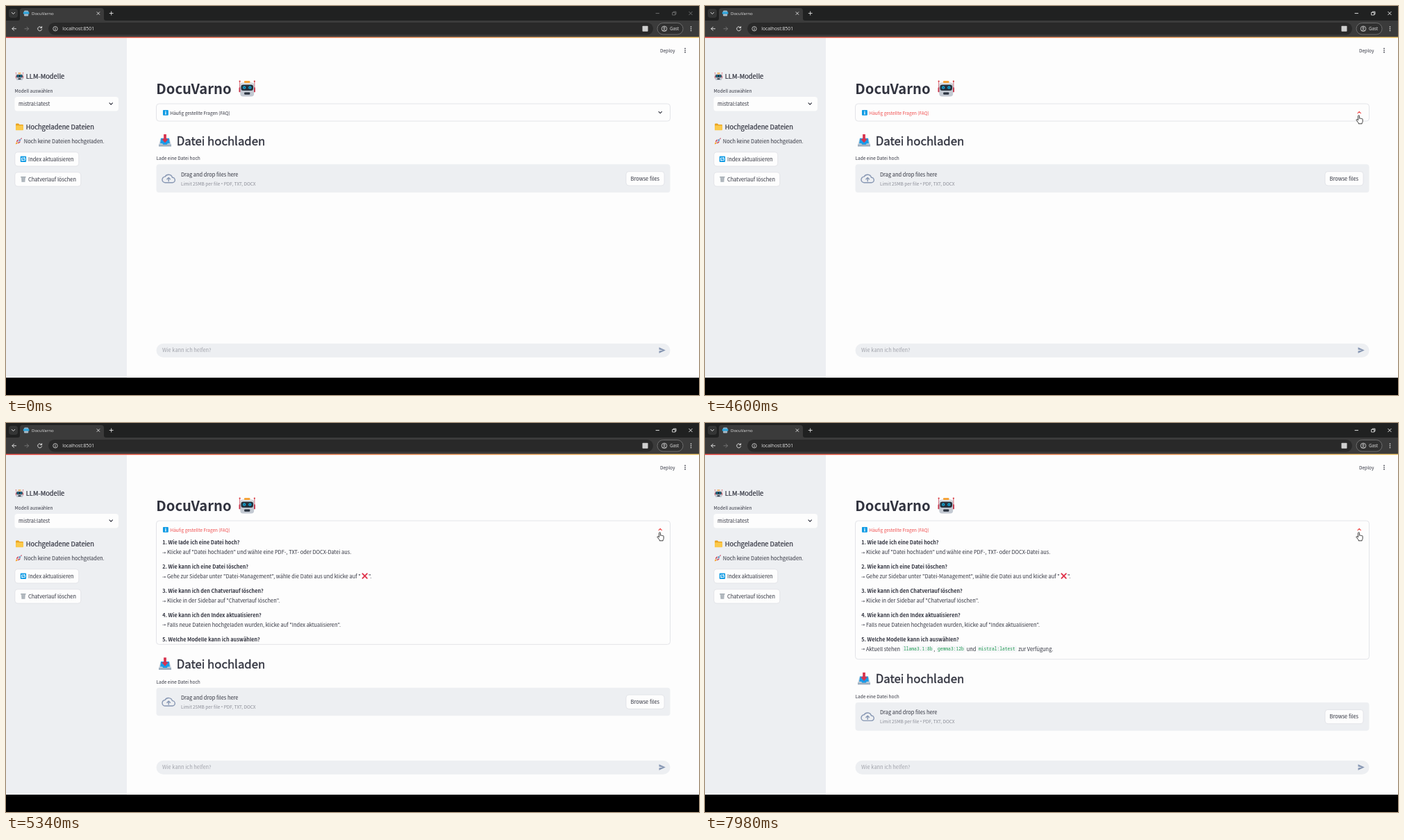
Animation, 998 px wide and 561 px high, one loop 8000 ms. Source, as an HTML page:

```html
<!DOCTYPE html>
<html lang="de">
<head>
<meta charset="utf-8">
<title>DocuVarno</title>
<style>
  html, body { margin: 0; width: 100%; height: 100%; overflow: hidden; background: #000; }
  svg { display: block; width: 998px; height: 561px; }
  text { font-family: "Noto Sans CJK SC", "Noto Sans CJK JP", "Noto Sans CJK", "Noto Sans", sans-serif; fill: #31333f; white-space: pre; }
  .ui { font-family: "Open Sans", "Noto Sans", sans-serif; fill: #e3e3e3; }
  .code { font-family: "Noto Sans Mono", monospace; fill: #1d9a50; }
  .arrow { font-family: "DejaVu Sans", sans-serif; }
  .bullet { font-family: "Open Sans", sans-serif; }
  .semi { stroke: #31333f; stroke-width: .024em; }
  .line { fill: none; stroke-linecap: round; stroke-linejoin: round; }
</style>
</head>
<body>
<svg id="stage" viewBox="0 0 998 561" xmlns="http://www.w3.org/2000/svg"></svg>
<script>
const LOOP = 8000;
const NAME = "DocuVarno";
const INK = "#31333f", RED = "#f04a4a", PANEL = "#edeff2", EDGE = "#dcdde2";

// The CJK family's Latin letters are drawn larger than the wanted design size.
const FONT_SCALE = 0.895;

const CLICK = 4560;
const MOVE = { start: 4220, end: 4460, from: [996, 300], to: [941.5, 157.5] };
const OPEN = { start: 4868, duration: 1415, distance: 174.7 };
const BOX = { top: 141, height: 25 };

const text = (x, y, size, s, attrs = "") =>
  `<text x="${x}" y="${y}" font-size="${(size * FONT_SCALE).toFixed(2)}" ${attrs}>${s}</text>`;
const ui = (x, y, size, s) => `<text class="ui" x="${x}" y="${y}" font-size="${size}">${s}</text>`;
const heading = (x, y, size, s) => text(x, y, size, s, 'class="semi"');
const rect = (x, y, w, h, r, fill, attrs = "") =>
  `<rect x="${x}" y="${y}" width="${w}" height="${h}" rx="${r}" fill="${fill}" ${attrs}/>`;
const line = (d, color, width = 1, attrs = "") =>
  `<path class="line" d="${d}" stroke="${color}" stroke-width="${width}" ${attrs}/>`;
const circle = (x, y, r, fill, attrs = "") => `<circle cx="${x}" cy="${y}" r="${r}" fill="${fill}" ${attrs}/>`;
const use = (id, x, y, size) => `<use href="#${id}" x="${x}" y="${y}" width="${size}" height="${size}"/>`;
const button = (x, y, w, h) => rect(x, y, w, h, 4, "#fdfdfd", `stroke="${EDGE}" stroke-width=".7"`);
const dots = (x, y, gap, color) => [-gap, 0, gap].map(d => circle(x, y + d, 0.85, color)).join("");
const chevron = (x, y, up) => `M${x - 2.2} ${y + (up ? 1.1 : -1.1)}l2.2 ${up ? -2.2 : 2.2}l2.2 ${up ? 2.2 : -2.2}`;

const defs = `<defs>
  <linearGradient id="stripe"><stop stop-color="#f0504a"/><stop offset="1" stop-color="#f8cf72"/></linearGradient>
  <clipPath id="boxClip"><rect id="clipRect" x="217" y="${BOX.top}" width="739" height="24"/></clipPath>
  <symbol id="robot" viewBox="0 0 24 24">
    ${line("M1.6 2V12M22.4 2V12", "#c9485a", 0.8)}
    ${circle(1.6, 2, 1.1, "#d9363e")}${circle(22.4, 2, 1.1, "#d9363e")}
    ${rect(0.5, 10.5, 3, 7, 1.2, "#c7344a")}${rect(20.5, 10.5, 3, 7, 1.2, "#c7344a")}
    ${rect(2.3, 3.8, 19.4, 19.7, 4, "#c3c9d2")}${rect(3.6, 4.4, 16.8, 8, 3, "#dde1e6")}
    ${rect(7.8, 1.4, 8.4, 3, 1.2, "#f6a43a")}
    ${rect(3.4, 6.8, 17.2, 8.4, 3, "#26313c")}
    ${circle(8, 11, 2.1, "#14b4e6")}${circle(16, 11, 2.1, "#14b4e6")}
    ${circle(8, 11, 0.9, "#0b4d68")}${circle(16, 11, 0.9, "#0b4d68")}
    ${rect(8, 17.6, 8, 3.2, 1, "#2b3440")}
  </symbol>
  <symbol id="inbox" viewBox="0 0 20 20">
    <path d="M3.5 6.5h13l3 10v2.5h-19v-2.5z" fill="#c9d3dd"/>
    <path d="M3.8 6.5h12.4l1 8H14l-1.5 2.3h-5L6 14.5H2.8z" fill="#1b9be8"/>
    <path d="M.5 16h19v3h-19z" fill="#9fb0c0"/>
    <path d="M8 .5h4v7h3.2L10 13.5 4.8 7.5H8z" fill="#d8344f"/>
  </symbol>
  <symbol id="folder" viewBox="0 0 12 12">
    <path d="M.6 2q0-1 1-1h3l1.2 1.5h4.6q1 0 1 1V10h-10.8z" fill="#e9a21f"/>
    <path d="M.6 10.8V4.5q0-.7.8-.7h9.2q.8 0 .8.8v5.4q0 .8-.8.8z" fill="#fbc94b"/>
  </symbol>
  <symbol id="rocket" viewBox="0 0 12 12">
    <path d="M2 6.3 4.3 3.5h2.3L3.7 7.5zM5.6 10 8.5 7.7V5.4L4.5 8.3z" fill="#d8344f"/>
    <path d="M3.3 7.5Q5.6 2.2 11.4.6 9.9 6.3 4.5 8.7z" fill="#c2ccd8"/>
    <path d="M9.2 1.5 11.4.6l-.9 2.3z" fill="#d8344f"/>
    ${circle(7.8, 4.2, 1.1, "#2486c8")}<path d="M1 11l.6-2.7 1.5-1 1.4 1.4-1 1.6z" fill="#f7a531"/>
  </symbol>
  <symbol id="sync" viewBox="0 0 10 10">
    ${rect(0.3, 0.3, 9.4, 9.4, 1.4, "#109be4")}
    ${line("M2.3 5.2V3.3h4.8M7.7 4.8v1.9H2.9", "#fff", 1)}
    <path d="M6.3 1.7 8.2 3.3 6.3 4.9zM3.7 5.1 1.8 6.7l1.9 1.6z" fill="#fff"/>
  </symbol>
  <symbol id="info" viewBox="0 0 10 10">
    ${rect(0.3, 0.3, 9.4, 9.4, 1.2, "#109be4")}${circle(5, 2.6, 0.9, "#fff")}${rect(4.2, 4.2, 1.6, 4, 0.2, "#fff")}
  </symbol>
  <symbol id="bin" viewBox="0 0 10 10">
    <path d="M1.5 2h7L7.8 9.6H2.2z" fill="#c3c9ce"/>
    ${line("M3.3 3.3l.3 5.3M5 3.3v5.3M6.7 3.3l-.3 5.3", "#929ba2", 0.6)}
    ${rect(0.9, 0.8, 8.2, 1.5, 0.7, "#9ba4aa")}
  </symbol>
</defs>`;

const favicon = rect(25.8, 6.5, 6.6, 4, 1.5, "#8fb4cc") +
  rect(24.8, 8.6, 8.6, 3.2, 1.2, "#2aa5de") + rect(26, 11.4, 6.2, 3, 1, "#a9b9c6");

const browser = `
  ${rect(0, 0, 998, 45, 0, "#202121")}
  ${rect(0, 21, 998, 24, 0, "#3b3b3b")}
  ${rect(0, 44.6, 998, 1.5, 0, "url(#stripe)")}
  <path d="M17 21q3 0 3-3V7q0-4 4-4h113q4 0 4 4v11q0 3 3 3z" fill="#3b3b3b"/>
  ${rect(4, 4, 13, 13, 4, "#343535")}
  ${line(chevron(10.5, 10.5), "#e3e3e3", 1)}
  ${favicon}
  ${ui(37, 12.9, 6.1, NAME)}
  ${line("M131 8.7l3.8 3.8M134.8 8.7l-3.8 3.8M149.2 10.5h5M151.7 8v5", "#e3e3e3", 0.9)}
  <g id="windowKeys">
    ${line("M936 10.6h4.5M983.7 8.3l4.5 4.5M988.2 8.3l-4.5 4.5", "#fff", 0.9)}
    ${line("M960 9.3h3.8v3.7h-3.8zM961.2 9.3V8.2h3.8v3.6h-1.2", "#fff", 0.8)}
  </g>
  ${line("M14.5 32.8h-5.5M11.5 30.2l-2.6 2.6 2.6 2.6", "#dedede", 1)}
  ${line("M27 32.8h5.5M30 30.2l2.6 2.6-2.6 2.6", "#747474", 1)}
  ${line("M51.3 31.3a3 3 0 1 0 .3 2.4M51.6 29.6v2h-2", "#dedede", 1)}
  ${rect(61, 24, 871, 17.5, 8.7, "#292929")}
  ${circle(71, 32.8, 3.2, "none", 'stroke="#dedede" stroke-width=".8"')}
  ${line("M71 32.6v1.8M71 31.1v.1", "#dedede", 0.9)}
  ${ui(81.2, 35.2, 6.8, "localhost:8501")}
  ${rect(916.5, 28.8, 8, 8, 0.8, "#cfcfcf")}
  ${rect(938, 24.5, 37, 16.5, 8.2, "#303030", 'stroke="#858585" stroke-width=".7"')}
  ${circle(948, 32.8, 3.8, "none", 'stroke="#dedede" stroke-width=".8"')}
  ${circle(948, 31.7, 1.2, "none", 'stroke="#dedede" stroke-width=".8"')}
  ${line("M945.5 35.3q2.5-2 5 0", "#dedede", 0.8)}
  ${ui(956, 35, 6.2, "Gast")}
  ${dots(986.5, 32.8, 2.7, "#dedede")}`;

const sidebar = `
  ${rect(0, 45, 174, 491, 0, PANEL)}
  ${use("robot", 13.5, 95.5, 12)}
  ${heading(28.8, 104.7, 10.4, "LLM-Modelle")}
  ${text(12.5, 124.7, 7.28, "Modell auswählen")}
  ${rect(12.5, 131, 149.5, 20.5, 4, "#fdfdfd")}
  ${text(18, 144, 8.32, "mistral:latest")}
  ${line(chevron(151.2, 141), INK, 1.2)}
  ${use("folder", 13.5, 168.5, 12)}
  ${heading(28.8, 177.9, 10.4, "Hochgeladene Dateien")}
  ${use("rocket", 13, 189.8, 10.5)}
  ${text(25.8, 198.1, 8.32, "Noch keine Dateien hochgeladen.")}
  ${button(12.8, 210.7, 92, 20.3)}
  ${use("sync", 20.3, 216.2, 9.2)}
  ${text(32, 223.7, 8.32, "Index aktualisieren")}
  ${button(12.8, 239.8, 95, 20.3)}
  ${use("bin", 20.3, 245.2, 9.2)}
  ${text(32, 252.8, 8.32, "Chatverlauf löschen")}`;

const faq = [
  ["Wie lade ich eine Datei hoch?", 'Klicke auf "Datei hochladen" und wähle eine PDF-, TXT- oder DOCX-Datei aus.'],
  ["Wie kann ich eine Datei löschen?", 'Gehe zur Sidebar unter "Datei-Management", wähle die Datei aus und klicke auf "'],
  ["Wie kann ich den Chatverlauf löschen?", 'Klicke in der Sidebar auf "Chatverlauf löschen".'],
  ["Wie kann ich den Index aktualisieren?", 'Falls neue Dateien hochgeladen wurden, klicke auf "Index aktualisieren".'],
  ["Welche Modelle kann ich auswählen?", "Aktuell stehen"]
];
const entry = ([question, answer], i) => {
  const y = 175.3 + i * 34.95;
  return text(225.2, y, 8.15, `${i + 1}. ${question}`, 'font-weight="600"') +
    `<text class="arrow" x="225" y="${y + 13.3}" font-size="6.2">→</text>` +
    text(232, y + 13.4, 8.32, answer);
};
const chip = (x, w, s) => rect(x, 321, w, 9.5, 2, "#f5f6f8") +
  `<text class="code" x="${x + 2}" y="327.8" font-size="6.3">${s}</text>`;
const answers = faq.map(entry).join("") +
  line("M513.5 217.3l6.4 6.6M519.9 217.3l-6.4 6.6", "#e0344c", 1.9) +
  text(522, 223.6, 8.32, '".') +
  chip(284, 45, "llama3.1:8b") + text(329.3, 328.5, 8.32, ",") +
  chip(333, 42, "gemma3:12b") + text(376.8, 328.5, 8.32, "und") +
  chip(392, 57, "mistral:latest") + text(451.3, 328.5, 8.32, "zur Verfügung.");

const upload = `
  ${use("inbox", 219.5, 184.5, 19)}
  ${heading(245.7, 200.7, 18.72, "Datei hochladen")}
  ${text(216.5, 222.3, 7.28, "Lade eine Datei hoch")}
  ${rect(216.5, 228.3, 740, 40.7, 4, PANEL)}
  ${line("M229.5 254.7a4.3 4.3 0 0 1-.4-8.6 5.7 5.7 0 0 1 10.4 1.2 3.7 3.7 0 0 1 .2 7.4zM234.2 252.7v-4.7M231.9 249.8l2.3-2.2 2.3 2.2", "#8797b3", 1.4)}
  ${text(252, 245.8, 8.32, "Drag and drop files here")}
  ${text(252, 258.7, 7.28, 'Limit 25MB per file <tspan class="bullet">•</tspan> PDF, TXT, DOCX', 'style="fill:#8c8e98"')}
  ${button(893, 238.7, 55, 20.3)}
  ${text(899.5, 251.5, 8.32, "Browse files")}`;

const page = `
  ${rect(0, 45, 998, 491, 0, "#fdfdfd")}
  ${sidebar}
  ${text(942, 66.6, 7.28, "Deploy")}
  ${dots(978, 64, 2.7, INK)}
  ${text(216.3, 127, 22.6, NAME, 'font-weight="700"')}
  ${use("robot", 335, 106.5, 24.5)}
  <rect id="box" x="216.5" y="${BOX.top}" width="740" height="${BOX.height}" rx="4" fill="none" stroke="${EDGE}" stroke-width=".8"/>
  ${use("info", 225.7, 149.7, 8.4)}
  ${text(236.5, 156.7, 7.2, "Häufig gestellte Fragen (FAQ)", 'id="summary"')}
  ${line(chevron(942.2, 153.5), INK, 1.1, 'id="toggle"')}
  <g clip-path="url(#boxClip)">${answers}</g>
  <g id="upload">${upload}</g>
  ${rect(216.5, 486.7, 740, 20, 10, PANEL)}
  ${text(225, 499.4, 8.32, "Wie kann ich helfen?", 'style="fill:#a2a4ac"')}
  <path d="M940.5 492.3l9.3 4.2-9.3 4.2v-3.3l5.5-.9-5.5-.9z" fill="#8797b3"/>
  ${rect(0, 536, 998, 25, 0, "#000")}`;

const cursor = `<g id="cursor" stroke="#111" stroke-width=".8" stroke-linejoin="round" fill="#fff">
  <path id="pointer" d="M0 0v9.5l2.2-2 1.5 3.4 1.5-.7-1.5-3.3h3z"/>
  <path id="hand" d="M-1 1.2Q-1 .2 0 .2t1 1v3.6q.8-.7 1.6 0 .9-.5 1.6.3 1.3-.3 1.4 1v2.7q0 1.6-1 2.5v1h-5v-1.2l-3-3.8q-.5-1 .4-1.3.7-.2 2 1.3z"/>
</g>`;

document.getElementById("stage").innerHTML = defs + page + browser + cursor;
const $ = id => document.getElementById(id);
const clamp = v => Math.min(1, Math.max(0, v));

// cubic-bezier(.23, 1, .32, 1)
function easeOut(x) {
  let lo = 0, hi = 1;
  for (let i = 0; i < 24; i++) {
    const s = (lo + hi) / 2, r = 1 - s;
    if (0.69 * r * r * s + 0.96 * r * s * s + s * s * s < x) lo = s; else hi = s;
  }
  return 1 - (1 - lo) ** 3;
}

function render(t) {
  const clicked = t >= CLICK;
  const m = 1 - (1 - clamp((t - MOVE.start) / (MOVE.end - MOVE.start))) ** 2;
  const [x, y] = MOVE.from.map((a, i) => a + (MOVE.to[i] - a) * m);
  const hover = t >= MOVE.start && x < 956 && y < 166;
  const grow = OPEN.distance * easeOut(clamp((t - OPEN.start) / OPEN.duration));

  $("cursor").style.display = t >= MOVE.start ? "" : "none";
  $("cursor").setAttribute("transform", `translate(${x} ${y})`);
  $("hand").style.display = hover ? "" : "none";
  $("pointer").style.display = hover ? "none" : "";
  $("windowKeys").setAttribute("opacity", clicked ? 0.95 : 0.38);

  $("summary").style.fill = hover ? RED : INK;
  $("toggle").setAttribute("stroke", hover ? RED : INK);
  $("toggle").setAttribute("d", chevron(942.2, 153.5, clicked));
  $("box").setAttribute("height", BOX.height + grow);
  $("clipRect").setAttribute("height", BOX.height - 0.5 + grow);
  $("upload").setAttribute("transform", `translate(0 ${grow})`);
}

const begin = performance.now();
function tick() {
  render((performance.now() - begin) % LOOP);
  requestAnimationFrame(tick);
}
tick();
</script>
</body>
</html>
```
